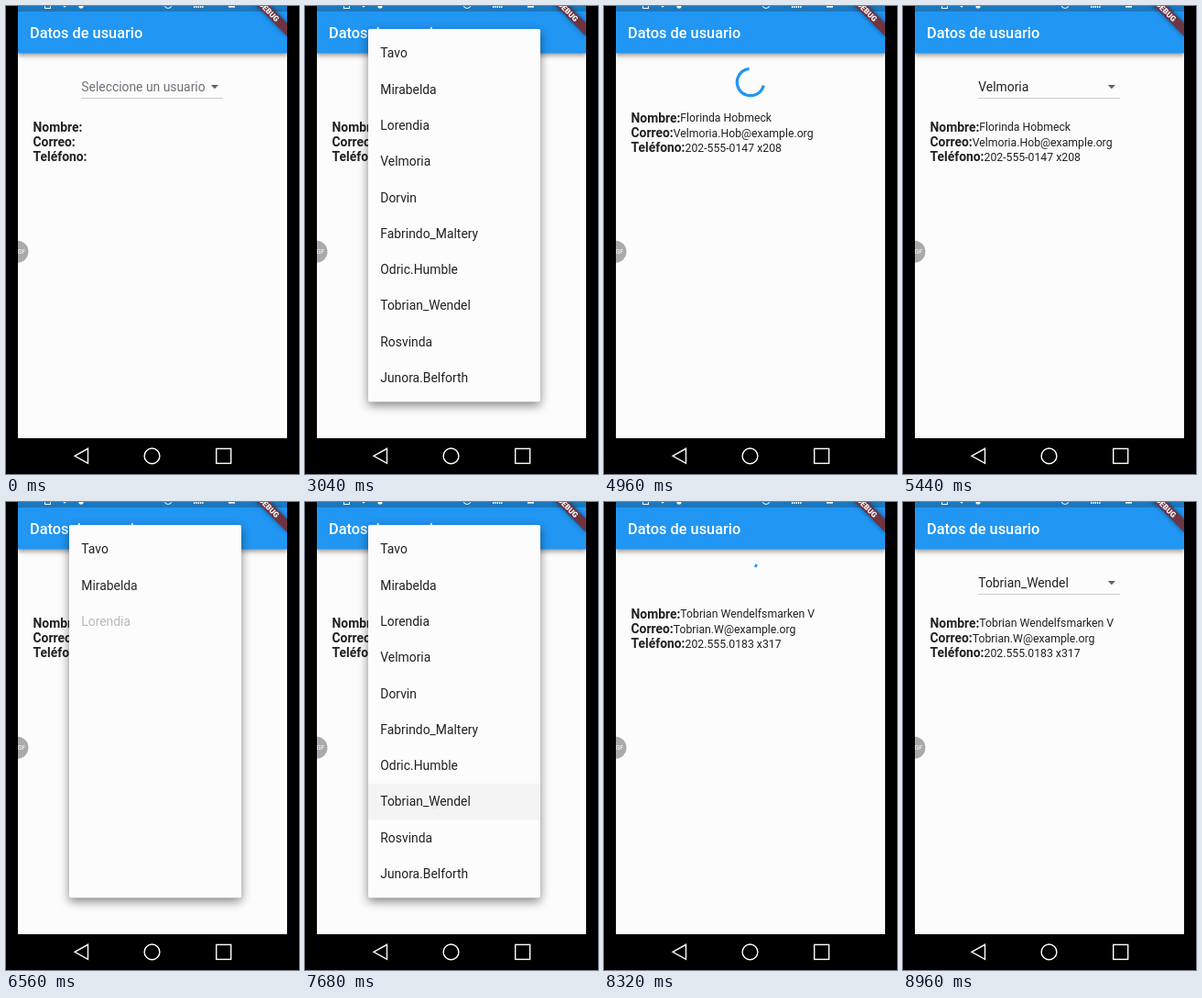
Animation of 320x510 px, one loop 9.6 s. Source, as an HTML page with a canvas:

```html
<!DOCTYPE html>
<html lang="es">
<head>
<meta charset="utf-8">
<title>Datos de usuario</title>
<style>
  html, body { margin: 0; width: 100%; height: 100%; overflow: hidden; background: #000; }
  canvas { display: block; width: 320px; height: 510px; }
</style>
</head>
<body>
<canvas id="stage"></canvas>
<script>
const canvas = document.getElementById('stage');
const ctx = canvas.getContext('2d');
const ratio = window.devicePixelRatio || 1;
canvas.width = 320 * ratio;
canvas.height = 510 * ratio;

const LOOP = 9600, TICK = 160;
const PAPER = '#fcfcfc', BLUE = '#2196f3', INK = '#212121';
const accounts = ['Tavo', 'Mirabelda', 'Lorendia', 'Velmoria', 'Dorvin',
  'Fabrindo_Maltery', 'Odric.Humble', 'Tobrian_Wendel', 'Rosvinda', 'Junora.Belforth'];
const empty = { account: null, details: ['', '', ''] };
const first = { account: accounts[3],
  details: ['Florinda Hobmeck', 'Velmoria.Hob@example.org', '202-555-0147 x208'] };
const second = { account: accounts[7],
  details: ['Tobrian Wendelfsmarken V', 'Tobrian.W@example.org', '202.555.0183 x317'] };

const clamp = v => Math.max(0, Math.min(1, v));

// Material standard easing: cubic-bezier(0.4, 0, 0.2, 1)
function standardEase(x) {
  let low = 0, high = 1;
  for (let i = 0; i < 20; i++) {
    const u = (low + high) / 2, v = 1 - u;
    if (1.2 * v * v * u + 0.6 * v * u * u + u ** 3 < x) low = u; else high = u;
  }
  return 3 * low * low - 2 * low ** 3;
}

function text(value, x, y, size, weight = 400, color = INK) {
  ctx.font = `${weight} ${size}px Roboto, sans-serif`;
  ctx.fillStyle = color;
  ctx.fillText(value, x, y);
  return ctx.measureText(value).width;
}

function rect(x, y, w, h, color) {
  ctx.fillStyle = color;
  ctx.fillRect(x, y, w, h);
}

function polygon(...points) {
  ctx.beginPath();
  points.forEach(([x, y]) => ctx.lineTo(x, y));
  ctx.closePath();
}

function disc(x, y, r, color) {
  ctx.beginPath();
  ctx.arc(x, y, r, 0, 2 * Math.PI);
  ctx.fillStyle = color;
  ctx.fill();
}

function withShadow(color, blur, dy, draw) {
  ctx.save();
  ctx.shadowColor = color;
  ctx.shadowBlur = blur * ratio;
  ctx.shadowOffsetY = dy * ratio;
  draw();
  ctx.restore();
}

function drawAppBar() {
  withShadow('rgba(0,0,0,.4)', 5, 2, () => rect(13, 0, 294, 51.5, BLUE));
  rect(13, 0, 294, 6, '#1c77bd');
  text('Datos de usuario', 26, 34.8, 16.34, 500, '#fff');
  ctx.strokeStyle = '#fff';
  ctx.lineWidth = 1;
  ctx.strokeRect(42.5, -3, 6, 5.5);
  ctx.beginPath();
  ctx.arc(177, -1.5, 4, 0, Math.PI);
  ctx.stroke();
  disc(64, 0, 1.4, '#fff');
  disc(82, 0, 2.6, '#fff');
  for (let i = 0; i < 5; i++) rect(205 + i * 2.3, 0, 1.3, 2, '#fff');
  rect(243, 0, 7, 1.6, '#fff');
}

function drawDetails(details, shift) {
  ['Nombre:', 'Correo:', 'Teléfono:'].forEach((label, i) => {
    const y = 136.9 + i * 16.27 + shift;
    const width = text(label, 29.5, y, 13.88, 700);
    text(details[i], 29.5 + width, y - 0.55, 12.25);
  });
}

function drawDropdown(account) {
  text(account || 'Seleccione un usuario', 82.3, 92.6, 13.88, 400, account ? INK : '#6f7278');
  polygon([223.8, 86], [232, 86], [227.9, 90.2]);
  ctx.fillStyle = '#616161';
  ctx.fill();
  rect(82, 100, 155, 0.8, '#c4c4c4');
}

function drawSpinner(cycles) {
  const step = Math.floor(cycles), phase = cycles - step;
  const head = standardEase(clamp(phase * 2));
  const tail = standardEase(clamp(phase * 2 - 1));
  const start = Math.PI * (-0.5 + tail * 1.5 + phase * 1.7 - step * 0.8);
  ctx.beginPath();
  ctx.arc(160, 83, 14.7, start, start + Math.max((head - tail) * 1.5 * Math.PI, 0.001));
  ctx.strokeStyle = BLUE;
  ctx.lineWidth = 3.27;
  ctx.stroke();
}

// The panel fades in, grows out of the selected row, then reveals its rows in turn.
function drawMenu(progress, selected, pressed) {
  const rowHeight = 39.3, top = 25, height = 406.3;
  const grow = clamp(progress * 4 - 1);
  const y = top + (6.5 + selected * rowHeight) * (1 - grow);
  const h = rowHeight + (height - rowHeight) * grow;
  ctx.save();
  ctx.globalAlpha = clamp(progress * 4);
  withShadow('rgba(0,0,0,.48)', 11, 4, () => {
    ctx.beginPath();
    ctx.roundRect(69, y, 188, h, 1.7);
    ctx.fillStyle = PAPER;
    ctx.fill();
  });
  if (pressed !== null) {
    rect(69, top + 6.7 + pressed * rowHeight, 188, rowHeight, '#f4f4f4');
    disc(142, 330, 5, '#ececec');
  }
  const unit = 0.5 / (accounts.length + 1.5);
  accounts.forEach((name, i) => {
    ctx.globalAlpha = clamp((progress - 0.5 - (i + 1) * unit) / (1.5 * unit));
    text(name, 82.3, 56.3 + i * rowHeight, 13.88);
  });
  ctx.restore();
}

function drawBanner() {
  ctx.save();
  ctx.translate(287.35, 6.05);
  ctx.rotate(Math.PI / 4);
  withShadow('rgba(0,0,0,.5)', 5, 0, () => rect(-32.7, -4.9, 65.4, 9.8, '#6e3443'));
  ctx.textAlign = 'center';
  text('DEBUG', 0, 3, 8.33, 900, '#fff');
  ctx.restore();
}

function drawNavigation() {
  ctx.strokeStyle = '#fff';
  ctx.lineWidth = 1.4;
  polygon([75, 490.3], [89.5, 482.3], [89.5, 498.3]);
  ctx.stroke();
  ctx.beginPath();
  ctx.arc(159.5, 490.4, 8.4, 0, 2 * Math.PI);
  ctx.stroke();
  ctx.strokeRect(229.7, 482.4, 16, 16);
}

function loading(time, before, after) {
  const ticks = time / TICK;
  return ticks < 3
    ? { user: before, spin: 0.3 + ticks * 0.28 }
    : { user: after, spin: 0.06 + (ticks - 3) * 0.28 };
}

function sceneAt(t) {
  if (t < 3040) return { user: empty };
  if (t < 4320) return { user: empty, menu: 1, selected: 0 };
  if (t < 5440) return loading(t - 4320, empty, first);
  if (t < 6560) return { user: first };
  if (t < 7840) return { user: first, menu: clamp(0.65 + (t - 6560) / 300), selected: 3,
    pressed: t >= 7680 ? 7 : null };
  if (t < 8960) return loading(t - 7840, first, second);
  return { user: second };
}

function draw(t) {
  const { user, spin, menu, selected, pressed = null } = sceneAt(t);
  const isLoading = spin !== undefined;
  ctx.setTransform(ratio, 0, 0, ratio, 0, 0);
  rect(0, 0, 320, 510, '#000');
  ctx.save();
  ctx.beginPath();
  ctx.rect(13, 0, 294, 471);
  ctx.clip();
  rect(13, 0, 294, 471, PAPER);
  drawAppBar();
  drawDetails(user.details, isLoading ? -10 : 0);
  if (isLoading) drawSpinner(spin);
  else if (!menu) drawDropdown(user.account);
  if (menu) drawMenu(menu, selected, pressed);
  drawBanner();
  disc(12.5, 267.7, 12, '#aaa');
  text('GF', 12.5, 270.3, 7, 400, '#fff');
  ctx.restore();
  drawNavigation();
}

function frame() {
  const t = performance.now() % LOOP;
  draw(Math.floor(t / TICK) * TICK);
  requestAnimationFrame(frame);
}
frame();
</script>
</body>
</html>
```
